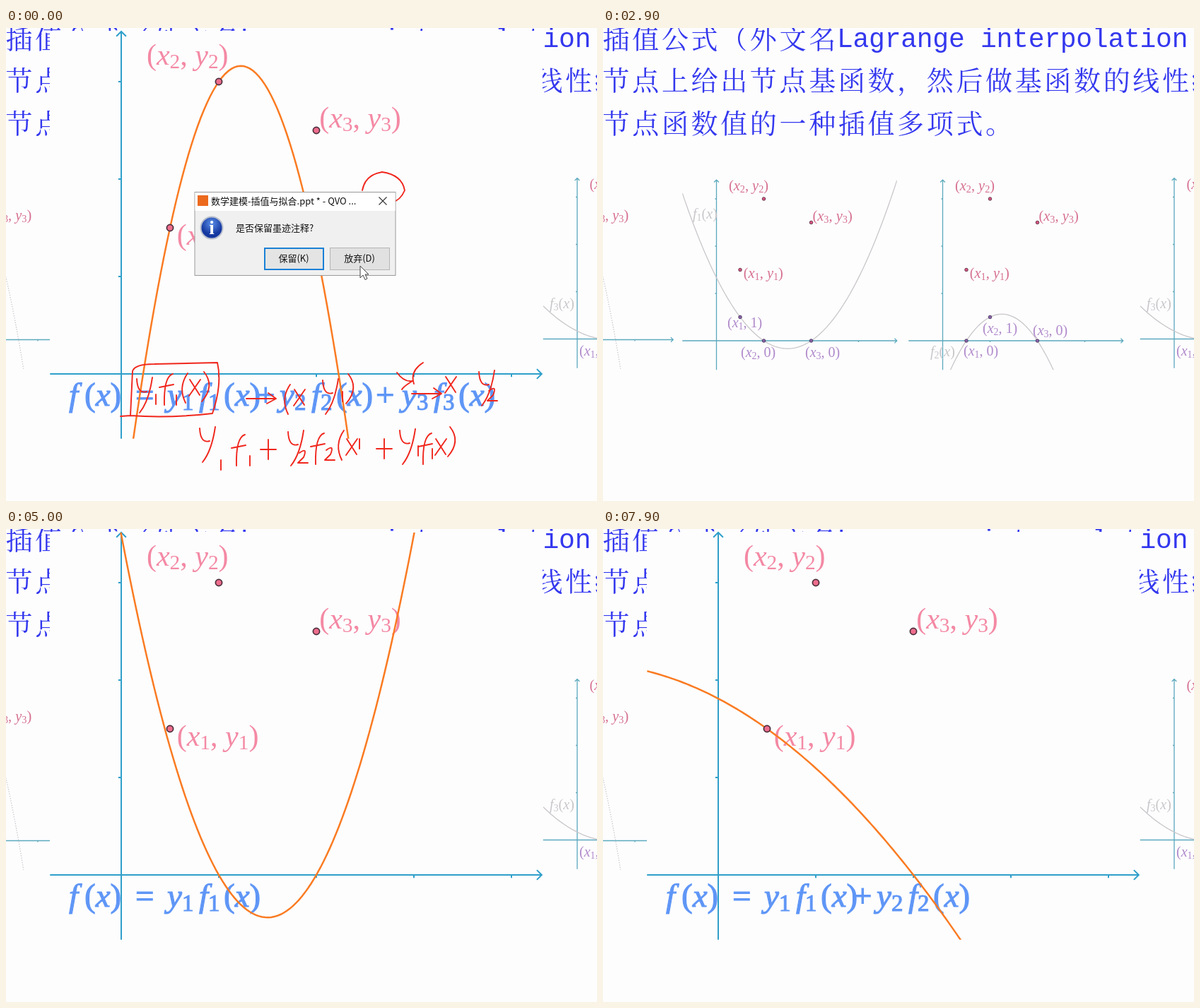
Write an HTML page that moves like this. It is 836x670 px and loops after 8000 ms.

```html
<!DOCTYPE html>
<html lang="zh">
<head>
<meta charset="utf-8">
<title>拉格朗日插值法</title>
<style>
html, body { margin: 0; width: 100%; height: 100%; overflow: hidden; background: #fdfdfe; }
svg { display: block; }
path { fill: none; }
.math { font-family: "Liberation Serif", serif; white-space: pre; }
.math .v { font-style: italic; }
.cjk { font: 500 38px "Noto Serif CJK SC", "Noto Sans CJK SC", "Noto Sans CJK", serif; letter-spacing: 3.65px; fill: #3438ee; }
.latin { font-family: "Liberation Mono", monospace; font-weight: 400; letter-spacing: -.25px; white-space: pre; }
.ui { font: 13px "Noto Sans CJK SC", "Noto Sans CJK", sans-serif; fill: #111; }
.ink path { stroke: #f0261c; stroke-width: 1.9; stroke-linecap: round; stroke-linejoin: round; }
</style>
</head>
<body>
<svg id="stage" width="836" height="670" viewBox="0 0 836 670"></svg>
<script>
const PINK = '#f489a4', ROSE = '#d6708f', PURPLE = '#b089cb', GREY = '#c9c6c9', BLUE = '#5f96f6';
const POINTS = [[1, 3], [2, 6], [4, 5]];
const LABELS = [[1.14, 2.8, '(x1, y1)'], [.52, 6.5, '(x2, y2)'], [4.06, 5.21, '(x3, y3)']];

const f1 = x => (x - 2) * (x - 4) / 3;
const f2 = x => -(x - 1) * (x - 4) / 2;
const f3 = x => (x - 1) * (x - 2) / 6;
const mix = (a, b, c) => x => a * f1(x) + b * f2(x) + c * f3(x);

// Italic variables, with a digit right after a letter set as a subscript.
function math(x, y, size, color, text, extra = '') {
  const body = text.replace(/([a-z])(\d?)/g, (_, v, sub) => `<tspan class="v">${v}</tspan>` +
    (sub && `<tspan font-size="70%" baseline-shift="-18%">${sub}</tspan>`));
  return `<text class="math" x="${x}" y="${y}" font-size="${size}" fill="${color}" ${extra}>${body}</text>`;
}

const line = (d, color, width, extra = '') => `<path d="${d}" stroke="${color}" stroke-width="${width}" ${extra}/>`;
const rect = (x, y, w, h, fill, extra = '') => `<rect x="${x}" y="${y}" width="${w}" height="${h}" fill="${fill}" ${extra}/>`;

function curve(p, f) {
  const pts = [];
  for (let i = 0; i <= 160; i++) {
    const x = p.left + (p.right - p.left) * i / 160;
    pts.push(`${(p.x + x * p.u).toFixed(2)} ${(p.y - f(x) * p.u).toFixed(2)}`);
  }
  return 'M' + pts.join('L');
}

function axes(p, color, width) {
  const { x, y, u } = p, a = u * .1;
  const top = y - p.top * u, end = x + p.right * u;
  let d = `M${x + p.left * u} ${y}H${end}m${-a} ${-a}l${a} ${a}l${-a} ${a}` +
    `M${x} ${y + p.bottom * u}V${top}m${-a} ${a}l${a} ${-a}l${a} ${a}`;
  for (let k = 2; k < p.top; k += 2) d += `M${x} ${y - k * u}h${-u * .06}`;
  for (let k = 2; k < p.right; k += 2) d += `M${x + k * u} ${y}v${u * .06}`;
  return line(d, color, width);
}

const dot = (p, [x, y], r, fill, edge) =>
  `<circle cx="${p.x + x * p.u}" cy="${p.y - y * p.u}" r="${r}" fill="${fill}" stroke="${edge}" stroke-width="${r * .38}"/>`;

const labels = (p, color) => LABELS.map(([x, y, text]) =>
  math(p.x + x * p.u, p.y - y * p.u + p.u * .15, p.u * .609, color, text)).join('');

const clip = (id, p) => `<clipPath id="${id}">` + rect(p.x + p.left * p.u, p.y - p.top * p.u,
  (p.right - p.left) * p.u, (p.top + p.bottom) * p.u, '#000') + '</clipPath>';

function smallPlot(id, x, y, f, marks, notes, dash = '') {
  const p = { x, y, u: 33.5, left: -1.44, right: 7.62, top: 6.8, bottom: 1.23 };
  return clip(id, p) + axes(p, '#5ba9bd', 1.3) +
    line(curve(p, f), GREY, 1.3, `clip-path="url(#${id})" stroke-dasharray="${dash}"`) +
    labels(p, ROSE) + POINTS.map(q => dot(p, q, 2.3, '#d8527c', '#5b3348')).join('') +
    marks.map(q => dot(p, q, 2.3, '#8a62a8', '#48365c')).join('') +
    notes.map(([nx, ny, text]) => math(nx, ny, 20, text[0] === 'f' ? GREY : PURPLE, text)).join('');
}

const big = { x: 163, y: 490, u: 69, left: -1.46, right: 8.62, top: 7.03, bottom: 1.33 };

const slideText = `<g class="cjk">
  <text x="-170" y="-55">拉格朗日插值法</text>
  <text x="-167" y="29">拉格朗日插值公式（外文名</text>
  <text class="latin" x="331" y="27">Lagrange interpolation formula</text>
  <text x="1007" y="29">）</text>
  <text x="-167" y="88">指的是在节点上给出节点基函数，然后做基函数的线性组合，组</text>
  <text x="-167" y="149">合系数为节点函数值的一种插值多项式。</text></g>`;

const plots =
  smallPlot('p0', -156, 441.5, mix(3, 6, 5), [], [], '1.3 2') +
  smallPlot('p1', 160.5, 443, f1, [[1, 1], [2, 0], [4, 0]],
    [[127, 270, 'f1(x)'], [176, 424, '(x1, 1)'], [195, 466, '(x2, 0)'], [286, 466, '(x3, 0)']]) +
  smallPlot('p2', 480.5, 443, f2, [[2, 1], [1, 0], [4, 0]],
    [[463, 465, 'f2(x)'], [537, 432, '(x2, 1)'], [510, 464, '(x1, 0)'], [608, 435, '(x3, 0)']]) +
  smallPlot('p3', 808, 440.5, f3, [[1, 0], [2, 0], [4, 1]],
    [[769, 397, 'f3(x)'], [811, 464, '(x1, 0)'], [864, 464, '(x2, 0)'], [936, 431, '(x3, 1)']]);

const heavy = parts => parts.map(([x, s]) => math(x, 535, 47, BLUE, s, `stroke="${BLUE}" stroke-width="1.1"`)).join('');
const term = (x, n) => heavy([[x, 'y' + n], [x + 45, 'f' + n], [x + 80, '(x)']]);

const video = `<g id="video">${rect(62, 4, 697, 578, '#fdfdfe')}${clip('big', big)}` +
  axes(big, '#2f9fca', 2) + labels(big, PINK) +
  heavy([[89, 'f'], [111, '(x)'], [183, '=']]) + term(228, 1) +
  `<g id="term2">${heavy([[354, '+']])}${term(387, 2)}</g>` +
  `<g id="term3">${heavy([[523, '+']])}${term(560, 3)}</g>` +
  '<path id="curve" stroke="#fa7b22" stroke-width="2.5" clip-path="url(#big)"/>' +
  POINTS.map(q => dot(big, q, 4.6, '#ee6d8d', '#4b2f3c')).join('') + '</g>';

const waves = `<linearGradient id="sea"><stop stop-color="#d3f0fd"/><stop offset=".45" stop-color="#a6dff9"/>
  <stop offset="1" stop-color="#e2f5fd"/></linearGradient>
  <linearGradient id="haze" x2="0" y2="1"><stop stop-color="#d9f2fd"/><stop offset="1" stop-color="#fbfdfe"/></linearGradient>
  <path d="M0 583Q130 581 280 597T560 593T809 583V632H0Z" style="fill:url(#haze)"/>
  <path d="M0 593Q140 592 270 603T540 601T809 597V600Q640 604 480 609T180 604T0 598Z" style="fill:url(#sea)"/>
  <path d="M0 622Q200 600 400 602T809 624Q600 606 400 607T0 622Z" style="fill:#c3ebfc"/>`;

const small = (x, y, text, size = 22) => math(x, y, size, '#222', text);
const desk = `<g id="desk">${rect(0, 0, 836, 670, '#e8e8e9')}${rect(0, 0, 810, 649, '#b4b4b6')}` +
  rect(0, 0, 809, 648, '#fdfdfe') + rect(826, 35, 20, 40, '#fafafa', 'rx="5" stroke="#c4c4c8"') + waves +
  small(190, 501, 'f(x) = y1f1(x) + y2f2(x) + y3f3(x)', 27.2) +
  small(266, 549, 'f(x)') + small(303, 549, '=') + small(317, 552, '∑', 29) + small(325, 529, 'k', 12) +
  small(319, 566, 'i=0', 11) + small(341, 549, 'y') + small(351, 571, 'i', 11) +
  small(356, 552, '∏', 28) + small(359, 567, 'j≠i', 11) +
  small(386, 535, 'x−x', 23) + small(421, 540, 'j', 12) + line('M383 543.5H430', '#222', 1.2) +
  small(383, 563, 'x') + small(393, 568, 'i', 12) + small(400, 563, '−x') + small(423, 568, 'j', 12) + '</g>';

const STROKES = {
  y: 'q1 22 14 18m8-20q-5 34-18 50',
  f: 'q-13 4-12 44m-7-25l20-4',
  x: 'l14 22m1-22l-16 23',
  1: 'v14',
  2: 'q12-9 6 6l-8 8h14',
  '+': 'h22m-11-14v28',
  '(': 'q-14 20-3 42',
  ')': 'q16 20-3 42',
  '>': 'h42m-11-8l11 8-13 7'
};
const WRITING = [
  ['y', 185, 497], [1, 212, 519], ['f', 236, 490], [1, 241, 520], ['(', 257, 489], ['x', 260, 498], [')', 280, 487],
  ['>', 340, 525], ['(', 402, 505], ['x', 408, 512], ['y', 448, 499], [1, 476, 515], [')', 484, 490],
  ['>', 574, 518], ['x', 622, 494], ['y', 669, 487], [2, 683, 514],
  ['y', 274, 567], [1, 304, 612], ['f', 338, 576], [1, 345, 606], ['+', 360, 597],
  ['y', 399, 572], [2, 415, 602], ['f', 450, 574], [2, 453, 598], ['(', 478, 570], ['x', 482, 582], [1, 500, 582],
  ['+', 524, 596], ['y', 557, 570], [1, 583, 592], ['f', 602, 574], [1, 603, 596], ['x', 608, 582], [')', 628, 565]
];
const ink = '<g id="ink" class="ink">' +
  '<path d="M162 550L176 549L179 486Q182 476 210 476L299 474Q306 505 292 546Q230 553 176 549"/>' +
  '<path d="M504 230Q508 208 532 204Q560 208 564 230Q558 244 546 247"/>' +
  '<path d="M590 474Q571 486 577 504M553 488Q563 502 575 500Q562 508 560 512"/>' +
  WRITING.map(([g, x, y]) => `<path d="M${x} ${y}${STROKES[g]}"/>`).join('') + '</g>';

const ui = (x, y, s, extra = '') => `<text class="ui" x="${x}" y="${y}" ${extra}>${s}</text>`;
const dialog = `<g id="dialog"><radialGradient id="ball" cy=".3"><stop stop-color="#5b8fe8"/>
  <stop offset="1" stop-color="#1538a0"/></radialGradient>` +
  rect(267, 232.5, 284, 118, '#f0f0f0', 'stroke="#9a9a9a"') + rect(267.5, 233, 283, 26, '#fff') +
  rect(271, 237, 15, 15, '#ec6a1e') + ui(290, 250, '数学建模-插值与拟合.ppt * - QVO ...') +
  line('M527.5 239.5l11 11m0-11l-11 11', '#333', 1.1) +
  '<circle cx="291" cy="283" r="15.5" fill="url(#ball)" stroke="#b9bfcc" stroke-width="2"/>' +
  '<text x="291" y="292" text-anchor="middle" font-family="Liberation Serif, serif" font-weight="bold" font-size="27" fill="#fff">i</text>' +
  ui(325, 288, '是否保留墨迹注释?') +
  rect(366, 312, 83, 30, '#e4e4e4', 'stroke="#1a80d6" stroke-width="2"') + ui(407, 331, '保留(K)', 'text-anchor="middle"') +
  rect(458.5, 311.5, 84, 31, '#e1e1e1', 'stroke="#b5b5b5"') + ui(500, 331, '放弃(D)', 'text-anchor="middle"') + '</g>';

const cursor = '<path id="cursor" d="M0 0V17L4 13L7 19.5L10 18L7 12H12Z" style="fill:#fff" stroke="#444" stroke-width="1"/>';

document.getElementById('stage').innerHTML = rect(0, 0, 836, 670, '#fdfdfe') + desk +
  `<g id="slide">${slideText}${plots}${video}</g>` + ink + dialog + cursor;

const part = id => document.getElementById(id);
const show = (id, on) => part(id).setAttribute('visibility', on ? 'visible' : 'hidden');

const Y1 = [[3100, 1], [3600, 1.39], [5000, 2.62], [5400, 3]];
const Y2 = [[5500, 0], [6100, .395], [7900, 2.19]];

function at(keys, t) {
  if (t <= keys[0][0]) return keys[0][1];
  for (let i = 1; i < keys.length; i++) {
    const [t0, a] = keys[i - 1], [t1, b] = keys[i];
    if (t <= t1) return a + (b - a) * (t - t0) / (t1 - t0);
  }
  return keys[keys.length - 1][1];
}

function draw(t) {
  const lesson = t < 800, editor = !lesson && t < 2100;
  const pointing = t >= 5800 && t < 6600;
  show('desk', editor);
  show('ink', t < 600);
  show('dialog', t < 500);
  show('cursor', lesson || pointing);
  part('cursor').setAttribute('transform', lesson ? 'translate(501 337)' : 'translate(268 341)');
  part('slide').setAttribute('transform', editor ? 'translate(99.8 118.9) scale(.639)' : '');
  part('video').setAttribute('display', t >= 2100 && t < 3000 ? 'none' : 'inline');
  part('term2').setAttribute('display', lesson || t >= 5500 ? 'inline' : 'none');
  part('term3').setAttribute('display', lesson ? 'inline' : 'none');
  const f = lesson ? mix(3, 6, 2.55) : mix(at(Y1, t), at(Y2, t), 0);
  part('curve').setAttribute('d', curve(big, f));
}

const start = performance.now();
function tick() {
  const t = (performance.now() - start) % 8000;
  draw(Math.floor(t / 100) * 100);
  requestAnimationFrame(tick);
}
tick();
</script>
</body>
</html>
```
